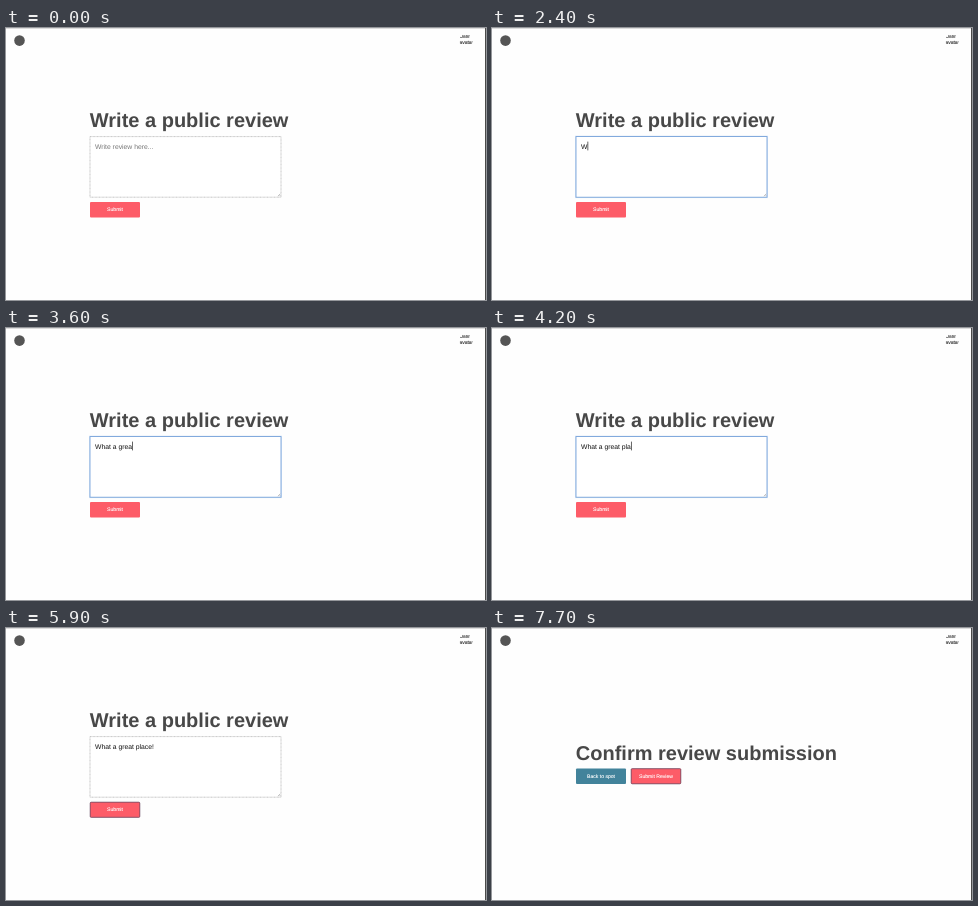
Recreate the animation shown at these times as an HTML page. Size 480 by 272 pixels, loop 8 s.

```html
<!DOCTYPE html>
<html lang="en">
<head>
<meta charset="utf-8">
<title>Write a review</title>
<style>
  html, body { margin: 0; width: 100%; height: 100%; overflow: hidden; background: #fefefe; }
  svg { display: block; width: 100vw; height: 100vh; }
  text { font-family: "Liberation Sans", Arial, sans-serif; text-rendering: geometricPrecision; white-space: pre; }
  .title { font-size: 20px; font-weight: bold; fill: #484848; }
  .input { font-size: 6.8px; }
  .label { font-size: 5.1px; fill: #fff; stroke: #fff; stroke-width: .12px; text-anchor: middle; }
  .alt { font-size: 5px; fill: #333; stroke: #333; stroke-width: .12px; }
</style>
</head>
<body>
<svg viewBox="0 0 480 272" preserveAspectRatio="none">
  <defs><clipPath id="round"><circle cx="460" cy="12.8" r="6.7"/></clipPath></defs>
  <rect width="480" height="272" fill="#fefefe"/>
  <rect width="480" height="1" fill="#dcdcdc"/>
  <rect x="479" width="1" height="272" fill="#4a4a4a"/>
  <circle cx="13.5" cy="12.6" r="5.3" fill="#555"/>
  <g clip-path="url(#round)" class="alt">
    <text x="453.4" y="10.4">User</text>
    <text x="453.4" y="16">avatar</text>
  </g>

  <g id="write">
    <text class="title" x="83.8" y="99">Write a public review</text>
    <rect id="ring" x="84" y="108.6" width="191" height="60.6" fill="none" stroke="#a9c8ee" stroke-width="1.8" opacity=".45"/>
    <rect id="box" x="84" y="108.6" width="191" height="60.6" fill="#fff" stroke-width=".8"/>
    <path d="M271.8 168.2l2.4-2.4M273.2 168.2l1-1" stroke="#888" stroke-width=".5"/>
    <text id="hint" class="input" x="89" y="120.5" fill="#777">Write review here...</text>
    <text id="typed" class="input" x="89" y="120.5" fill="#111" xml:space="preserve"></text>
    <rect id="caret" y="113.6" width=".7" height="8.8" fill="#222"/>
    <rect x="84" y="174" width="50" height="15.5" rx="1" fill="#fd5c68"/>
    <rect id="submitRing" x="84.2" y="174.2" width="49.6" height="15.1" rx="1" fill="none" stroke="#6a5068" stroke-width=".8"/>
    <text class="label" x="109" y="183.4">Submit</text>
  </g>

  <g id="confirm">
    <text class="title" x="83.8" y="132.3">Confirm review submission</text>
    <rect x="84" y="140.5" width="50" height="15.5" rx="1" fill="#42839b"/>
    <text class="label" x="109" y="149.9">Back to spot</text>
    <rect x="139" y="140.5" width="50" height="15.5" rx="1" fill="#fd5c68"/>
    <rect id="confirmRing" x="139.2" y="140.7" width="49.6" height="15.1" rx="1" fill="none" stroke="#6a5068" stroke-width=".8"/>
    <text class="label" x="164" y="149.9">Submit Review</text>
  </g>
</svg>
<script>
const LOOP = 8000;
const FOCUS = 1300, BLUR = 5900, CONFIRM = 6000, PRESS = 7700;
const MESSAGE = "What a great place!";

// Time of a keystroke and how many characters are in the field after it.
const KEYS = [
  [2400, 1], [2600, 2], [2700, 3], [2900, 4], [3000, 6], [3100, 7], [3200, 8],
  [3400, 9], [3500, 10], [3600, 11], [3700, 12], [3800, 13], [3900, 14],
  [4100, 15], [4200, 16], [4300, 17], [4400, 18], [4800, 19]
];
const BLINK_OFF = [[1700, 2300], [5300, 5800]];

const $ = id => document.getElementById(id);
const show = (id, on) => $(id).setAttribute("visibility", on ? "inherit" : "hidden");
const page = (id, on) => $(id).setAttribute("display", on ? "inline" : "none");

function draw(t) {
  const writing = t < CONFIRM;
  page("write", writing);
  page("confirm", !writing);
  show("confirmRing", t >= PRESS);
  if (!writing) return;

  const focused = t >= FOCUS && t < BLUR;
  const count = KEYS.reduce((n, [at, chars]) => t >= at ? chars : n, 0);
  const typed = $("typed");
  typed.textContent = MESSAGE.slice(0, count);
  show("hint", count === 0);
  show("ring", focused);
  show("submitRing", t >= BLUR);
  $("box").setAttribute("stroke", focused ? "#6a99d6" : "#b9b9b9");
  $("box").setAttribute("stroke-dasharray", focused ? "none" : "1 .4");

  show("caret", focused && !BLINK_OFF.some(([a, b]) => t >= a && t < b));
  $("caret").setAttribute("x", 89.1 + (count ? typed.getComputedTextLength() : 0));
}

const start = performance.now();
function tick() {
  draw((performance.now() - start) % LOOP);
  requestAnimationFrame(tick);
}
tick();
</script>
</body>
</html>
```
